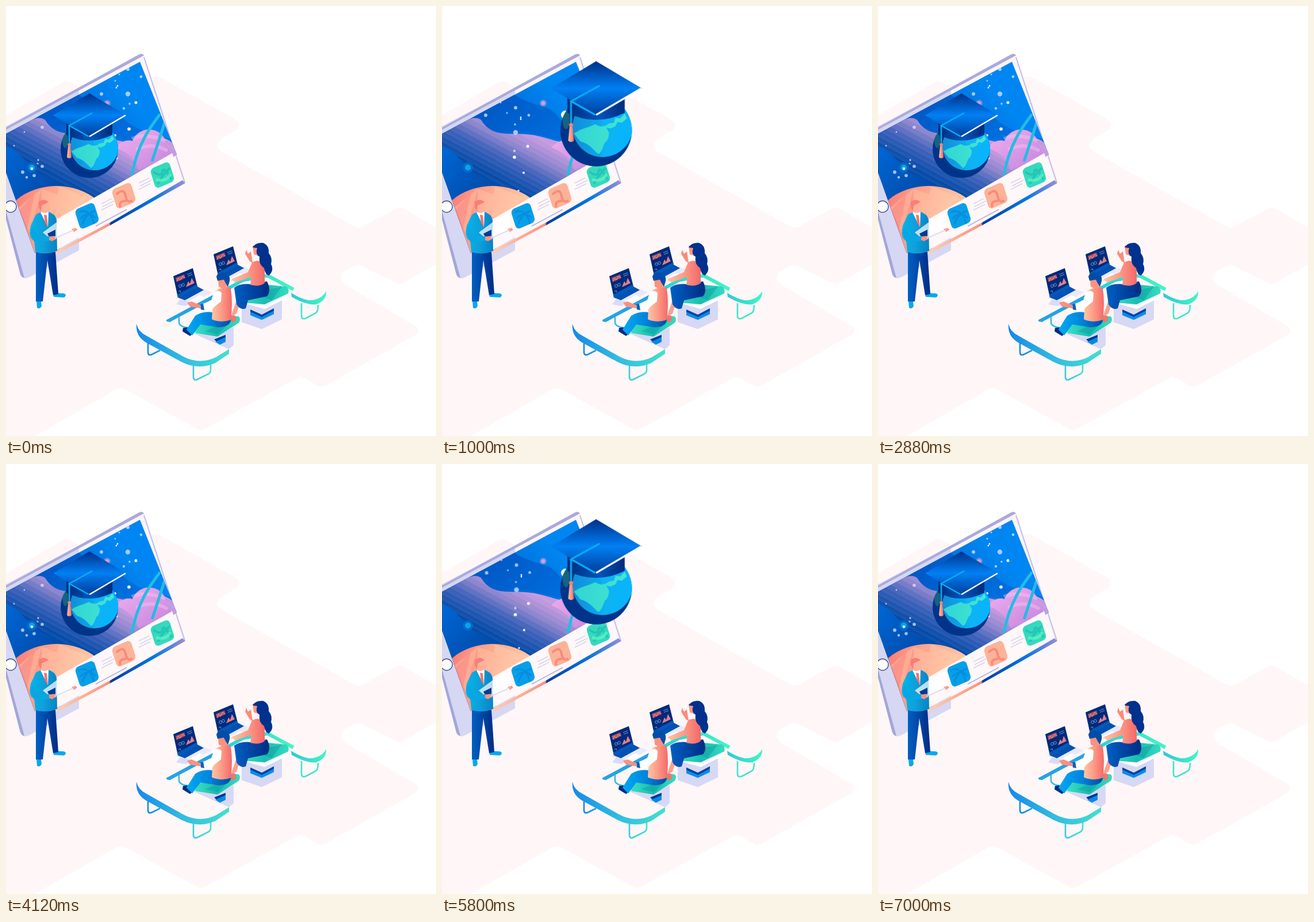
Recreate the animation shown at these times as an HTML page without scripts. Size 748 by 748 pixels, loop 9.12 s.

```html
<!DOCTYPE html>
<html lang="en">
<head>
<meta charset="utf-8">
<title>Online class</title>
<style>
html, body { margin: 0; width: 100%; height: 100%; overflow: hidden; background: #fff; }
svg { display: block; width: 100vw; height: 100vh; }
.globe { transform-origin: 145px 152px; animation: rise 9.12s infinite; }
.drift > * { --x: -84px; --y: 67px; animation: drift 9.12s infinite; }
.left > * { --x: -86px; --y: 14px; }
.white { fill: #fff; fill-opacity: 1; }
@keyframes rise {
  0%, 44.8% { transform: none; animation-timing-function: cubic-bezier(.65,0,.35,1); }
  10.96%, 55.8% { transform: translate(123px, -56px) scale(1.245); animation-timing-function: linear; }
  17.98%, 63.6% { transform: translate(123px, -56px) scale(1.245); animation-timing-function: cubic-bezier(.65,0,.35,1); }
  31.5%, 76.75%, 100% { transform: none; }
}
@keyframes drift {
  0%, 44.8% { transform: none; animation-timing-function: cubic-bezier(.6,0,.4,1); }
  10.96%, 56.4% { transform: translate(var(--x), var(--y)); animation-timing-function: linear; }
  17.98%, 63.4% { transform: translate(var(--x), var(--y)); animation-timing-function: cubic-bezier(.35,.4,.6,1); }
  31.5%, 76.75%, 100% { transform: none; }
}
</style>
</head>
<body>
<svg viewBox="0 0 748 748">
<defs>
  <linearGradient id="sky" x1="0" y1="1" x2="1" y2="0"><stop offset=".25" stop-color="#0047ad"/><stop offset=".72" stop-color="#0086f2"/></linearGradient>
  <linearGradient id="shade" x1="0" y1="0" x2="1" y2=".6"><stop stop-color="#0050bd"/><stop offset="1" stop-color="#0070e0"/></linearGradient>
  <linearGradient id="haze" gradientUnits="userSpaceOnUse" x1="137" y1="215" x2="92" y2="298"><stop stop-color="#c397de"/><stop offset=".3" stop-color="#8d83cd"/><stop offset=".6" stop-color="#3c5fb9"/><stop offset="1" stop-color="#0047a6"/></linearGradient>
  <linearGradient id="steps" gradientUnits="userSpaceOnUse" spreadMethod="repeat" x1="137" y1="215" x2="133" y2="222.4"><stop stop-color="#fff" stop-opacity="0"/><stop offset="1" stop-color="#fff" stop-opacity=".09"/></linearGradient>
  <linearGradient id="wave" x1="0" y1="0" x2="1" y2="1"><stop stop-color="#0068d8"/><stop offset=".5" stop-color="#004aa8"/><stop offset="1" stop-color="#0069d6"/></linearGradient>
  <linearGradient id="peach" x1="0" y1="0" x2="1" y2=".2"><stop offset=".1" stop-color="#fb7673"/><stop offset=".4" stop-color="#fda08a"/><stop offset=".85" stop-color="#ffcba9"/></linearGradient>
  <linearGradient id="pink" x1="0" y1="0" x2="1" y2="1"><stop stop-color="#f2b1ee"/><stop offset="1" stop-color="#c183dd"/></linearGradient>
  <linearGradient id="rim"><stop stop-color="#ffd0b2"/><stop offset=".41" stop-color="#fb8f7d"/><stop offset=".42" stop-color="#003b9c"/><stop offset=".75" stop-color="#0076e2"/><stop offset="1" stop-color="#9a8fd6"/></linearGradient>
  <linearGradient id="cap" x1="0" y1="0" x2="0" y2="1"><stop stop-color="#003088"/><stop offset=".5" stop-color="#0080f4"/><stop offset="1" stop-color="#003c98"/></linearGradient>
  <linearGradient id="band"><stop stop-color="#002a7c"/><stop offset=".55" stop-color="#0055bd"/><stop offset="1" stop-color="#002a7c"/></linearGradient>
  <linearGradient id="sea"><stop stop-color="#128ed8"/><stop offset=".55" stop-color="#0aaef0"/><stop offset="1" stop-color="#00b2ff"/></linearGradient>
  <linearGradient id="land"><stop stop-color="#31d5d4"/><stop offset="1" stop-color="#46e6d0"/></linearGradient>
  <linearGradient id="edge"><stop stop-color="#1488ea"/><stop offset=".5" stop-color="#33bce0"/><stop offset="1" stop-color="#43e0cf"/></linearGradient>
  <linearGradient id="mint"><stop stop-color="#2bc9d6"/><stop offset="1" stop-color="#43f5c4"/></linearGradient>
  <linearGradient id="cushion"><stop stop-color="#3ce0c2"/><stop offset=".5" stop-color="#18bdb2"/><stop offset="1" stop-color="#35dcc0"/></linearGradient>
  <linearGradient id="vest"><stop stop-color="#ffc6a6"/><stop offset=".5" stop-color="#fc9a85"/><stop offset="1" stop-color="#f4696a"/></linearGradient>
  <linearGradient id="coat"><stop stop-color="#00b6ee"/><stop offset=".5" stop-color="#109fd9"/><stop offset="1" stop-color="#0684c6"/></linearGradient>
  <linearGradient id="navy"><stop stop-color="#0060c4"/><stop offset="1" stop-color="#002b84"/></linearGradient>
  <linearGradient id="jeans"><stop stop-color="#00aaf4"/><stop offset=".5" stop-color="#0086de"/><stop offset="1" stop-color="#004aa8"/></linearGradient>
  <clipPath id="screen"><path d="M-5 225 233 97 297 258 85 428 50 430-5 275Z"/></clipPath>
  <clipPath id="ball"><circle cx="145" cy="249" r="50"/></clipPath>
  <clipPath id="west"><path d="M-5 0H127V500H-5Z"/></clipPath>
  <g id="laptop">
    <path d="M4 52 42 32 67 42 33 61Z" fill="#e9e9fa"/>
    <path d="M8 51 42 32 53 38 20 56Z" fill="#0052b4"/>
    <path d="M28 57 46 47 55 51 37 60Z" fill="#fff"/>
    <path d="M0 14 34 0 42 32 8 51Z" fill="#002a7a"/>
    <path d="M7 46 41 28 42 32 8 51Z" fill="#0059bd"/>
    <path d="M4 17 19 11 21 17 6 24Z" fill="#b2586a"/>
    <path d="M6 23 9 17 12 21 16 14 20 17" stroke="#ff8f7c" fill="none"/>
    <path d="M22 33 26 23 29 27 32 17 37 26Z" fill="#e0808f"/>
    <g fill="none" stroke="#6f9fdc"><circle cx="12" cy="31" r="2.4"/><circle cx="17" cy="29" r="2.4"/><path d="M9 41l3-2 1 3M24 11l8-3M25 14l8-3"/></g>
  </g>
  <rect id="tile" x="-18" y="-18" width="36" height="36" rx="7" transform="matrix(.92 -.4 .3 .95 0 0)"/>
  <path id="lines" d="M0 13 18 4M2 18 22 8M0 24 20 14" stroke="#c5c6ea" stroke-width="1.1"/>
</defs>

<path fill="#fef6f7" d="M0 190 98 133Q105 129 113 133L150 154 252 124Q262 120 270 125L398 197Q411 206 400 216L375 231Q360 243 376 254L605 383Q613 388 622 383L677 353Q685 348 692 353L748 385V449L692 481Q685 486 677 481L622 454Q613 448 604 453L588 462Q576 473 590 485L713 557Q722 564 713 572L556 660Q548 664 541 660L520 648Q512 643 505 648L347 735Q339 740 331 735L208 667Q200 662 192 667L50 748H0Z"/>

<g id="tablet">
  <path d="M-5 350V213L232 84Q238 81 241 88L312 308 88 432 40 472Q30 477 27 469Z" fill="#fef4f6"/>
  <path d="M-5 212V350L25 467Q29 477 40 472L127 425V142Z" fill="#d6d7f3" clip-path="url(#west)"/>
  <path d="M-5 214 232 84Q238 82 240 86L-5 218Z" fill="#a9aadb"/>
  <path d="M-5 352 25 467Q27 472 32 473L-5 338Z" fill="#a3a6d9"/>
  <path d="M240 89 311 307" stroke="#c1bde6" stroke-width="2"/>
  <path d="M88 426 182 376 307 303 312 308 182 381 88 432Z" fill="url(#rim)"/>
  <g clip-path="url(#screen)">
    <path d="M-5 80H320V440H-5Z" fill="url(#sky)"/>
    <path d="M55 190C85 235 110 210 160 222S220 240 300 235V235C230 215 215 210 200 190S150 175 120 150Z" fill="url(#shade)" opacity=".85"/>
    <g id="cloud">
      <path id="cloud-shape" d="M-5 220 40 201Q57 190 68 198C88 231 118 219 155 224S205 244 240 234 290 230 300 258L200 340H-5Z" fill="url(#haze)"/>
      <path d="M-5 220 40 201Q57 190 68 198C88 231 118 219 155 224S205 244 240 234 290 230 300 258L200 340H-5Z" fill="url(#steps)"/>
    </g>
    <path d="M-5 244C25 243 42 294 76 301S110 326 150 333V430H-5Z" fill="url(#wave)"/>
    <path d="M190 246Q206 230 220 235A31 31 0 0 1 280 244L290 262 230 285Q225 260 190 246Z" fill="url(#pink)"/>
    <path d="M219 231Q240 220 277 234M226 250Q254 236 281 252" stroke="#f8c8f3" stroke-width="6" fill="none" opacity=".4"/>
    <path d="M268 188C250 212 229 240 219 294M279 193Q269 225 254 270" fill="none" stroke="#23bce2" stroke-width="5"/>
    <ellipse cx="88" cy="398" rx="100" ry="85" fill="url(#peach)"/>
    <path d="M22 350 62 318 41 395ZM62 318 95 330 60 420ZM92 313 140 333 75 420Z" fill="#ffd9b5" opacity=".3"/>
    <path d="M18 362 50 326 32 410Z" fill="#f46f78" opacity=".3"/>
  </g>
  <circle cx="176" cy="169" r="6" fill="#8797e8" opacity=".65"/><circle cx="176" cy="169" r="3.5" fill="#d99be2"/>
  <circle cx="45" cy="281" r="9" fill="#0a6fcc" opacity=".75"/><circle cx="45" cy="281" r="5" fill="#08a4ea"/>
  <path d="M289 256 306 302 87 425 72 380Z" fill="#fff7f8"/>
  <circle cx="8" cy="349" r="10" fill="#fff" stroke="#42509b" stroke-width="1.4"/>
  <g transform="translate(141 365)"><use href="#tile" fill="#089fe9"/><path d="M-15-6Q5-15 12 14M-12 5Q2-10 15 4M-8 15Q-4-3 14-9" fill="none" stroke="#0074cc" stroke-width="3" opacity=".4"/></g>
  <g transform="translate(205 330)"><use href="#tile" fill="#fdb397"/><path d="M-13-2Q0-15 3 0T15 8M-6 20Q-10 9 4 9" fill="none" stroke="#f3726c" stroke-width="4" opacity=".6"/></g>
  <g transform="translate(272 294)"><use href="#tile" fill="#36d9bd"/><path d="M-16-6Q-2 5 0-6T16 8M-8 15Q2-3 13-12" fill="none" stroke="#12aab0" stroke-width="4" opacity=".45"/><path d="M-11 8Q8 13 14-2" fill="none" stroke="#5ff6c4" stroke-width="5" opacity=".7"/></g>
  <use href="#lines" x="166" y="331"/><use href="#lines" x="231" y="295"/>
  <path d="M156 383 210 354" stroke="#aeb1de" stroke-width="1.5"/>
</g>

<g class="drift" fill="#dce3ff" fill-opacity=".75">
  <circle cx="212" cy="110" r="3"/><circle cx="235" cy="123" r="2.4"/>
  <circle cx="212" cy="153" r="4.2"/><circle cx="197" cy="119" r="1.5"/>
  <circle cx="166" cy="153" r="3" style="--x:-90px;--y:37px"/>
  <circle cx="215" cy="170" r="1.8" style="--x:-88px;--y:36px"/>
  <circle cx="205" cy="178" r="2.2" style="--x:-79px;--y:74px"/>
  <circle cx="190" cy="130" r="1.5" style="--x:-88px;--y:38px"/>
  <circle class="white" cx="194" cy="139" r="1.4" style="--x:-57px;--y:55px"/>
  <circle class="white" cx="192" cy="142" r="1.4" style="--x:-55px;--y:55px"/>
  <circle class="white" cx="226" cy="168" r="2.5" style="--x:-77px;--y:76px"/>
  <circle class="white" cx="214" cy="214" r="2.8" style="--x:-88px;--y:49px"/>
  <circle class="white" cx="190" cy="225" r="2" style="--x:-48px;--y:65px"/>
  <circle class="white" cx="193" cy="265" r="1.6" style="--x:-60px;--y:56px"/>
</g>
<g class="drift left" fill="#dce3ff" fill-opacity=".75">
  <circle cx="63" cy="211" r="2.8"/><circle cx="32" cy="219" r="1.5"/><circle cx="14" cy="243" r="1.5"/>
  <circle cx="29" cy="289" r="3"/><circle cx="49" cy="295" r="2.8"/><circle cx="36" cy="298" r="2.2"/>
  <circle cx="63" cy="279" r="2.8"/><circle cx="56" cy="268" r="1.7"/><circle cx="55" cy="274" r="1.6"/>
  <circle class="white" cx="45" cy="283" r="2.3"/>
</g>

<g class="globe">
  <g class="drift"><circle cx="106" cy="232" r="6" fill="#fff" style="--x:-4px;--y:-5px"/></g>
  <circle cx="145" cy="249" r="50" fill="#00348a"/>
  <g clip-path="url(#ball)">
    <ellipse cx="154" cy="244" rx="42" ry="42" fill="url(#sea)"/>
    <path d="M152 204H200V262L172 282 152 286Z" fill="#22c9ff" opacity=".18"/>
    <path d="M114 253Q121 248 128 246T144 240Q151 245 158 242L163 252Q163 262 157 266L153 276Q149 284 146 280L138 272Q131 266 123 264ZM156 244 163 239 170 238 172 231 179 232 185 225 188 232 181 238 175 237 172 243 165 246Z" fill="url(#land)"/>
    <ellipse cx="103" cy="233" rx="5" ry="14" fill="#15647f"/>
  </g>
  <path d="M105 203V224Q145 244 185 224V203Z" fill="url(#band)"/>
  <path d="M145 152 209 190 145 228 82 190Z" fill="url(#cap)"/>
  <path d="M145 227 208 190" stroke="#fff" stroke-width="2.5"/>
  <path d="M150 186 110 208 144 227M110 208V238" fill="none" stroke="#08aef2" stroke-width="2.5"/>
  <path d="M108 243H112L114 263Q110 267 106 263Z" fill="url(#vest)"/>
  <circle cx="110" cy="241" r="2.8" fill="#f88376"/>
</g>

<g id="teacher">
  <path d="M53 512 61 514 62 522Q59 528 54 525ZM82 499 101 500Q107 503 101 507L83 506Z" fill="#05a9ed"/>
  <path d="M52 428H86L91 501 82 503 72 442 64 514H52Z" fill="url(#navy)"/>
  <path d="M52 363Q60 357 74 358 86 362 88 372L89 426Q70 434 51 428L49 408Q38 405 43 382Z" fill="url(#coat)"/>
  <path d="M60 359 74 358 73 385Z" fill="#fff"/>
  <path d="M66 363 71 364 73 385 68 377Z" fill="#f4726b"/>
  <path d="M57 340Q66 332 75 342L75 356Q70 362 62 359L57 352Z" fill="#fdb09a"/>
  <path d="M57 340Q66 334 74 341L62 347 61 357 57 351Z" fill="#f77f77"/>
  <path d="M64 394 91 374 118 357 120 386 79 407Z" fill="#fff" opacity=".72"/>
  <path d="M72 396 86 389V400L77 405Z" fill="#063a93"/>
  <path d="M46 384 55 399 78 401 77 408 52 412Q43 406 43 390Z" fill="#08a7e4"/>
  <path d="M75 401 85 400 88 405 80 409 75 407ZM114 388 121 386 124 389 118 393Z" fill="#fb9583"/>
  <path d="M85 404 119 389" stroke="#d6d7f0" stroke-width="1.5"/>
</g>

<g id="desk" fill="none">
  <path d="M247 586V602Q247 609 254 606L268 599M326 625V646Q327 653 334 649L352 640Q356 638 356 633V620M301 541V551Q302 558 318 560" stroke="url(#edge)" stroke-width="2.6"/>
  <path d="M514 517V540Q515 546 522 543L539 534Q543 531 543 520" stroke="#40e5cb" stroke-width="2.6"/>
  <path d="M280 549 366 503" stroke="#24a3e4" stroke-width="6"/>
  <path d="M366 503 412 477 455 469 500 493" stroke="url(#mint)" stroke-width="6"/>
  <path d="M227 554 282 549 327 568 388 596Q360 618 325 615L240 572Z" fill="#fef7f8"/>
  <path d="M496 499Q514 510 527 512 548 512 557 496 558 512 540 519 523 521 497 506Z" fill="url(#mint)"/>
  <path d="M227 553Q230 567 245 574L307 609Q336 625 365 611L388 597V605L364 621Q335 634 305 619L243 585Q225 574 227 553Z" fill="url(#edge)"/>
</g>

<use href="#laptop" x="361" y="418"/>

<g id="back-student">
  <path d="M410 512 445 524 480 506V545L445 562 410 550Z" fill="#d7d8f4"/>
  <path d="M425 528 445 537 466 526V536L445 546 425 538Z" fill="#0a8cec"/>
  <path d="M425 528 445 537 466 526V530L445 541 425 532Z" fill="#00439f"/>
  <path d="M410 511 450 522 490 502V507L450 527 411 516Z" fill="#fff"/>
  <path d="M410 508 455 485 488 488Q493 493 491 500L450 519 413 516Z" fill="url(#cushion)"/>
  <path d="M432 499 480 488 462 512Z" fill="#087f91" opacity=".3"/>
  <path d="M402 509 412 501 401 535 391 541Z" fill="#fba08d"/>
  <path d="M397 490Q407 482 427 484L454 479Q462 495 454 505L421 512 417 526Q408 530 401 519Z" fill="url(#navy)"/>
  <path d="M428 446Q440 439 450 450V482Q441 489 425 485L427 471 399 481 392 475 421 463Z" fill="url(#vest)"/>
  <path d="M418 424 421 431 426 427 429 447 424 444 416 431Z" fill="#fb8c7c"/>
  <path d="M429 417H440V435L431 432Z" fill="#fb9583"/>
  <path d="M429 420Q434 411 447 412 458 416 457 430 464 438 461 449 467 460 457 469 451 467 449 456 439 449 441 436 433 432 437 421Z" fill="#00318d"/>
</g>

<use href="#laptop" x="291" y="456"/>
<path d="M296 519 304 509 323 517 312 522Z" fill="#dadbf5"/>

<g id="front-student">
  <path d="M327 564 365 574 396 558V590L388 597 327 570Z" fill="#d7d8f4"/>
  <path d="M362 580 382 572V584L372 589Z" fill="#00388f"/><path d="M364 584 382 576V584L372 589Z" fill="#008be8"/>
  <path d="M327 559 378 537 405 540Q409 545 405 551L368 575 330 569Z" fill="url(#cushion)"/>
  <path d="M346 566 398 542 369 571Z" fill="#078896" opacity=".3"/>
  <path d="M308 560 315 559 324 571 320 574 307 566Z" fill="#002d83"/>
  <path d="M314 563 329 539Q342 530 360 533L391 545Q391 558 370 559L338 554 324 573Z" fill="url(#jeans)"/>
  <path d="M391 539 398 538 401 547 393 551Z" fill="#f4736d"/>
  <path d="M363 497Q376 487 391 491 395 518 391 546 374 552 358 545L359 528 370 512Z" fill="url(#vest)"/>
  <path d="M362 497Q370 493 375 499L374 514 351 532 339 528 338 520 357 512Z" fill="#fff"/>
  <path d="M338 519 343 518 345 529 339 528Z" fill="#0060bd"/>
  <path d="M315 516 323 514 339 521V526L320 523Z" fill="#fa907f"/>
  <path d="M369 474 388 471 387 488 379 493 370 488Z" fill="#fb927f"/>
  <path d="M366 471Q369 461 381 464 391 468 389 479L386 488 382 482 379 476 368 478Z" fill="#004da9"/>
</g>
</svg>
</body>
</html>
```
